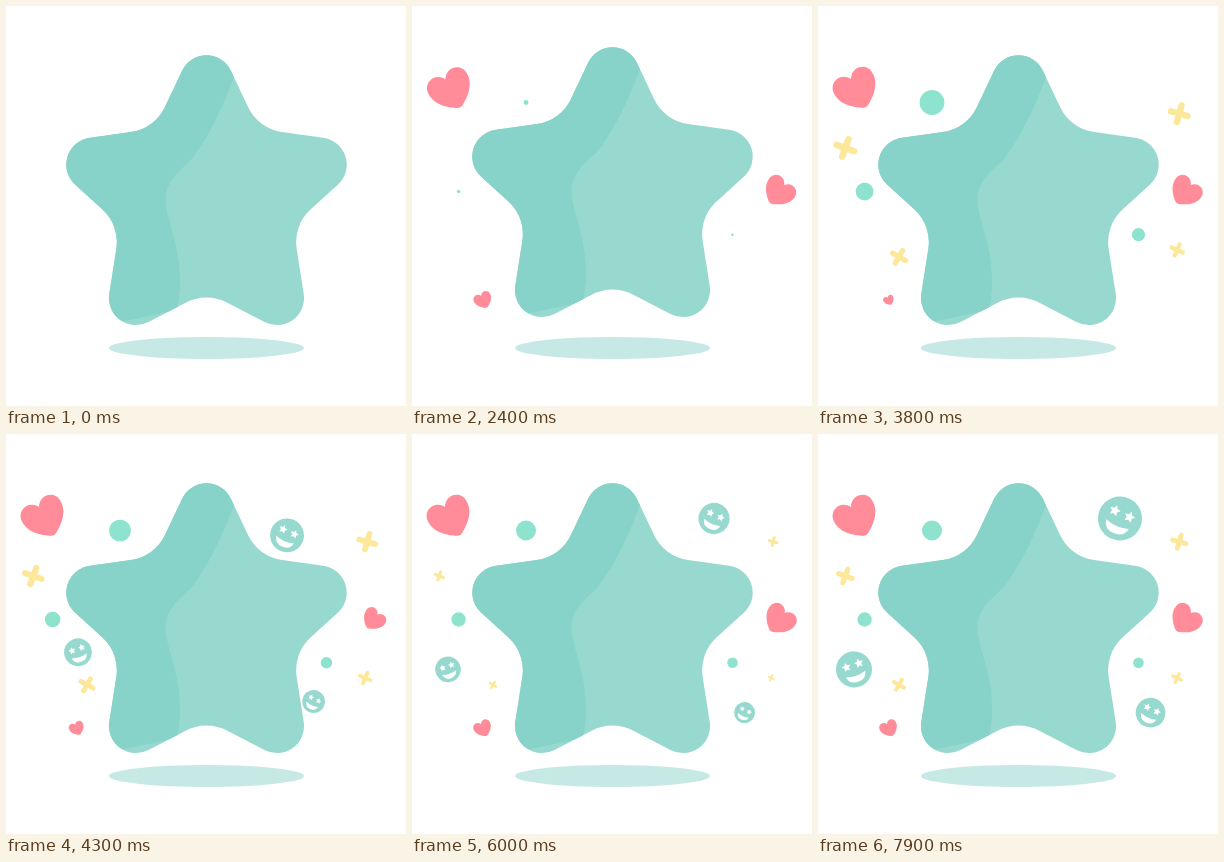
These frames come from a looping animation (400 px wide and 400 px high, 10 s). An HTML page:

```html
<!DOCTYPE html>
<html lang="en">
<head>
<meta charset="utf-8">
<title>Floating star</title>
<style>
  html, body { margin: 0; width: 100%; height: 100%; overflow: hidden; background: #fff; }
  svg { display: block; width: 100%; height: 100%; }
</style>
</head>
<body>
<svg viewBox="0 0 400 400">
  <defs>
    <path id="body" d="M176.1 64.8A27 27 0 0 1 224.9 64.8L242.2 101.3A44 44 0 0 0 276.2 126.1L317 131.8
      A27 27 0 0 1 332.3 178.2L304.5 203.6A44 44 0 0 0 290.8 243.7L297.7 287.8A27 27 0 0 1 258.5 316
      L221.8 297A44 44 0 0 0 179.2 297L142.5 316A27 27 0 0 1 103.3 287.8L110.2 243.7
      A44 44 0 0 0 96.5 203.6L68.7 178.2A27 27 0 0 1 84 131.8L124.8 126.1A44 44 0 0 0 158.8 101.3Z"/>
    <clipPath id="inside"><use href="#body"/></clipPath>
    <path id="heart" fill="#ff8c98" d="M3 21Q0 23 -3 21C-10 17 -23 8 -22.5 -6C-22 -19 -6 -22 0 -11
      C6 -22 22 -19 22.5 -6C23 8 10 17 3 21Z"/>
    <path id="plus" fill="none" stroke="#fde79a" stroke-width="5" stroke-linecap="round" d="M-7 0H7M0 -7V7"/>
    <g id="face">
      <circle r="22" fill="#97d9cf"/>
      <g fill="#fff">
        <path class="eye" transform="translate(-7.9 -5.2)"/>
        <path class="eye" transform="translate(8.1 -5.2)"/>
        <path d="M-12.5 6Q0 10.5 12.5 6Q10.5 16 0 16Q-10.5 16 -12.5 6Z"/>
      </g>
    </g>
  </defs>
  <ellipse cx="200.5" cy="342" rx="97.5" ry="11" fill="#c6e9e6"/>
  <g id="parts"></g>
  <g id="star">
    <use href="#body" fill="#97d9cf"/>
    <path clip-path="url(#inside)" fill="#87d3c9" d="M230 66C218 98 206 126 186 153C176 163 160 174 159.5 193
      C159.5 214 176 240 174 283Q173 294 171 304L0 340V0H230Z"/>
  </g>
</svg>
<script>
const NS = 'http://www.w3.org/2000/svg', LOOP = 10000, STEP = 100;
const parts = document.getElementById('parts');
const star = document.getElementById('star');

const ease = p => (1 - Math.cos(Math.PI * p)) / 2;

// Eased value between [time, value] keys, held at both ends
function track(t, ...keys) {
  if (t <= keys[0][0]) return keys[0][1];
  for (let i = 1; i < keys.length; i++) {
    const [t0, a] = keys[i - 1], [t1, b] = keys[i];
    if (t < t1) return a + (b - a) * ease((t - t0) / (t1 - t0));
  }
  return keys[keys.length - 1][1];
}

function add(tag, attrs) {
  const el = document.createElementNS(NS, tag);
  for (const k in attrs) el.setAttribute(k, attrs[k]);
  return parts.appendChild(el);
}

function place(el, x, y, size, turn = 0) {
  el.setAttribute('transform',
    `translate(${x.toFixed(2)} ${y.toFixed(2)}) rotate(${turn}) scale(${size.toFixed(4)})`);
}

function starPath(r) {
  let d = '';
  for (let i = 0; i < 10; i++) {
    const a = i * Math.PI / 5 - Math.PI / 2, q = i % 2 ? r * 0.5 : r;
    d += (i ? 'L' : 'M') + (q * Math.cos(a)).toFixed(2) + ' ' + (q * Math.sin(a)).toFixed(2);
  }
  return d + 'Z';
}
document.querySelectorAll('.eye').forEach(e => e.setAttribute('d', starPath(5.8)));

const use = (id, list) => list.map(o => ({ ...o, el: add('use', { href: '#' + id }) }));

const hearts = use('heart', [
  { x: 38, y: 82.3, x0: 138, y0: 170, size: 0.97, turn: -28, beat: 4600 },
  { x: 368, y: 185, x0: 234, y0: 188, size: 0.7, turn: 38, beat: 3900 },
  { x: 70.8, y: 294, x0: 128, y0: 229, size: 0.4, turn: -26, beat: 3200 }
]);
const faces = use('face', [
  { x: 302, y: 84.5, x0: 228, y0: 144, size: 1, turn: 24 },
  { x: 36, y: 235.4, x0: 163, y0: 175, size: 0.82, turn: -19 },
  { x: 332.6, y: 278.6, x0: 244.5, y0: 239.5, size: 0.675, turn: 25 }
]);
const pluses = use('plus', [
  { x: 361.2, y: 107.7, size: 0.97, turn: 16 },
  { x: 27.3, y: 142, size: 1.03, turn: 20 },
  { x: 81, y: 250.8, size: 0.82, turn: 30 },
  { x: 359.2, y: 244, size: 0.67, turn: 24 }
]);
const dots = [[114, 96.5, 10], [46.6, 185.5, 7.2], [320.5, 228.7, 5.3]]
  .map(([cx, cy, r]) => ({ r, el: add('circle', { cx, cy, fill: '#8ee3cf' }) }));

function slide(o, p, size) {
  place(o.el, o.x0 + (o.x - o.x0) * p, o.y0 + (o.y - o.y0) * p, o.size * size, o.turn);
}

function draw(t) {
  star.setAttribute('transform',
    `translate(0 ${track(t, [2000, 0], [2700, -13.2], [3400, 0]).toFixed(2)})`);

  const heartMove = track(t, [0, 0], [2500, 1]);
  for (const h of hearts)
    slide(h, heartMove, track(t, [h.beat, 1], [h.beat + 700, 0.57], [h.beat + 1400, 1]));

  const faceMove = track(t, [3400, 0], [4800, 1]);
  const faceSize = track(t, [4800, 0.77], [6350, 0.7], [7900, 1]);
  for (const f of faces) slide(f, faceMove, faceSize);

  const dotSize = track(t, [2000, 0], [3400, 1.3], [4800, 1]);
  for (const d of dots) d.el.setAttribute('r', (d.r * dotSize).toFixed(2));

  const plusSize = track(t, [2500, 0], [3900, 1.3], [5300, 0.75], [6600, 0.5], [7200, 1]);
  for (const p of pluses) place(p.el, p.x, p.y, p.size * plusSize, p.turn);
}

const start = performance.now();
function tick() {
  const t = (performance.now() - start) % LOOP;
  draw(Math.floor(t / STEP) * STEP);
  requestAnimationFrame(tick);
}
tick();
</script>
</body>
</html>
```
